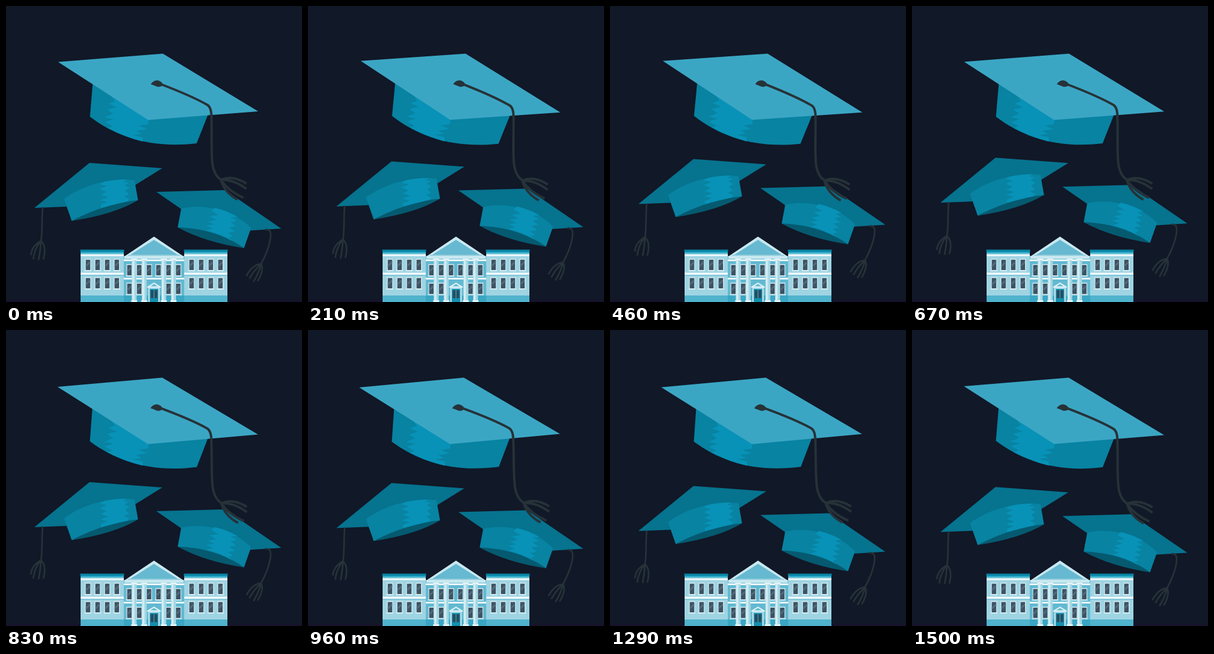
An HTML page for the animation above (1.54 s loop, 500x500 px).

```html
<!DOCTYPE html>
<html lang="en">
<head>
<meta charset="utf-8">
<title>Graduation caps</title>
<style>
  html, body { margin: 0; height: 100%; overflow: hidden; background: #111827; }
  svg { display: block; width: 100%; height: 100%; }
  .board { fill: #06738f; }
  .band { fill: #0883a2; }
  .inside { fill: #055a70; }
  .shine { fill: #0892b7; }
  .cord { fill: none; stroke: #263238; stroke-width: 2.8; stroke-linejoin: round; }
</style>
</head>
<body>
<svg viewBox="0 0 500 500">
  <defs>
    <g id="window">
      <path fill="#d6eef4" d="M-5 0.500h10v19.500h1v1.500h-12v-1.500h1z"/>
      <path fill="#3d5363" d="M-3.800 2h7.600v17.500h-7.600z"/>
      <path fill="#536b7b" d="M-3.800 11L3.800 4v4L-3.800 15z"/>
    </g>
    <g id="wing">
      <path fill="#9fd4e2" d="M126 412h73v88h-73z"/>
      <path fill="#0784a5" d="M125.500 411.500h74v3.500h-74z"/>
      <path fill="#22a5c4" d="M126 415h73v2.500h-73z"/>
      <path fill="#67bfd5" d="M126 417.500h73v2h-73z"/>
      <path fill="#f2fafc" d="M126 419.500h73v3h-73zM126 450.500h73v3.500h-73z"/>
      <path fill="#73c2d7" d="M126 454h73v1.500h-73z"/>
      <path fill="#50b3cd" d="M126 489h73v11h-73z"/>
      <g class="windows" data-x="138.5 154.700 171 187.200" data-y="426.5 457.500"></g>
    </g>
    <g id="column">
      <path fill="#b9e1eb" d="M-4 427h8v73h-8z"/>
      <path fill="#e4f4f8" d="M-5 427h10v2.500h-10zM-5 497h10v3h-10zM-2.500 430h1.500v67h-1.500z"/>
      <path fill="#96d0e0" d="M1.500 430h1.500v67h-1.500z"/>
    </g>
  </defs>

  <path fill="#15142a" d="M0 496h500v4H0z"/>

  <g id="building">
    <use href="#wing"/>
    <use href="#wing" x="175"/>
    <path fill="#62b9d1" d="M199 422h102v78H199z"/>
    <path fill="#f2fafc" d="M199 428h102v3H199zM199 459h102v3H199z"/>
    <path fill="#3aa6c4" d="M199 489h102v11H199z"/>
    <g class="windows" data-x="208.500 225 241.500 257.500 274.500 291" data-y="435.500"></g>
    <g class="windows" data-x="208.500 225 274.500 291" data-y="467"></g>
    <path fill="#c9e8f0" d="M250 389.500L300 423v4H200v-4z"/>
    <path fill="#66b9d1" d="M250 395L290.500 420.500H209.500z"/>
    <path fill="#8ecbdc" d="M206 420.500h88v1.500h-88z"/>
    <use href="#column" x="216.500"/>
    <use href="#column" x="233.500"/>
    <use href="#column" x="266.500"/>
    <use href="#column" x="283"/>
    <path fill="#d9f0f6" d="M250 467L261.500 474v2h-23v-2z"/>
    <path fill="#62b9d1" d="M250 469.500L256 473.500H244z"/>
    <path fill="#a9dae7" d="M240 476h20v24h-20z"/>
    <path fill="#158fae" d="M243 478h14v22h-14z"/>
    <path fill="#304858" d="M244.500 480h4.500v13.500h-4.500zM251 480h4.500v13.500h-4.500z"/>
  </g>

  <g id="smallCaps">
    <path class="board" d="M48 341L141 265 264 274 218 302.500 160 330 100 339z"/>
    <path class="inside" d="M111 363L165 320 223 328Q183 352 111 363z"/>
    <path class="band" d="M98 326C128 303 178 289 217 294L223 328C190 331 146 344 111 363z"/>
    <path class="shine" d="M166 297Q184 293 204 293L198 297 208 298 200 303 209 307 201 312 208 318 199 322 208 326 205 330Q183 335 161 341L160 336 172 331 159 328 173 323 160 319 170 314 158 309 171 304 158 301z"/>
    <path class="cord" d="M62 340C60 360 62 380 59 398M59 397Q43 406 42 421M59 397Q48 410 46 428M59 397Q58 415 55 429M59 397Q69 406 63 428"/>

    <path class="board" d="M254 314L370 311 465 376 400 380 296 343z"/>
    <path class="inside" d="M290 374L350 365 402 409Q336 399 290 374z"/>
    <path class="band" d="M296 342C332 333 386 345 414 375L402 409C375 389 335 375 290 374z"/>
    <path class="shine" d="M353 341Q374 346 391 356L380 357 390 363 379 365 389 372 377 374 387 381 375 383 384 389 376 391 382 397Q360 384 338 379L350 376 338 371 352 369 341 364 355 361 344 355 359 353 347 346z"/>
    <path class="cord" d="M438 378Q448 376 447 389C446 405 437 425 430 437M431 436Q417 436 406 456M431 436Q419 446 411 461M431 436Q427 451 418 466M431 436Q436 447 425 465"/>
  </g>

  <g id="bigCap">
    <path class="band" d="M146.500 131L141.800 187C188 222 246 241 322 232L341 184z"/>
    <path class="shine" d="M178 152L241 190 240 200 224 202 239 208 220 211 230 216 214 218 231 222 231 229Q201 221 172 206L180 203 167 196 182 191 166 188 181 182 171 175 187 171 173 165 184 161z"/>
    <path fill="#3ba6c4" d="M88 94.500L265 80.500 426 178 240 192.500z"/>
    <path fill="#263238" d="M244.500 132Q249 125.500 255.500 125.500 263 127 265.500 133 262 137 256 136.500 249 133.500 244.500 132z"/>
    <path class="cord" style="stroke-width:4" d="M260 131.500C285 141 320 155.500 340 167Q347 171 347 187C348 215 346 250 349 269Q353 289 365 294M363 294Q382 285 406 300M363 294Q383 292 406 309M363 294Q376 313 401 324M363 294Q369 315 391 327"/>
  </g>
</svg>
<script>
  const LOOP = 1540, HALF = LOOP / 2, TOP_TIME = 710;
  const smallCaps = document.getElementById('smallCaps');
  const bigCap = document.getElementById('bigCap');

  for (const group of document.querySelectorAll('.windows')) {
    const list = name => group.dataset[name].split(' ');
    group.innerHTML = list('y').flatMap(y =>
      list('x').map(x => `<use href="#window" x="${x}" y="${y}"/>`)).join('');
  }

  // Gently eased rise and fall, highest at TOP_TIME.
  function bob(t) {
    const gap = Math.abs(t - TOP_TIME);
    const u = Math.min(gap, LOOP - gap) / HALF;
    return -9.1 + 9.5 * (u + (1 - Math.cos(Math.PI * u)) / 2) / 2;
  }

  const tilt = t => -0.15 + 0.85 * Math.sin(2 * Math.PI * (t + 40) / LOOP);

  const start = performance.now();
  function draw(now) {
    const t = Math.max(0, now - start) % LOOP;
    smallCaps.setAttribute('transform', `translate(0 ${bob(t)})`);
    bigCap.setAttribute('transform', `rotate(${tilt(t)} 256.5 203)`);
    requestAnimationFrame(draw);
  }
  draw(start);
</script>
</body>
</html>
```
